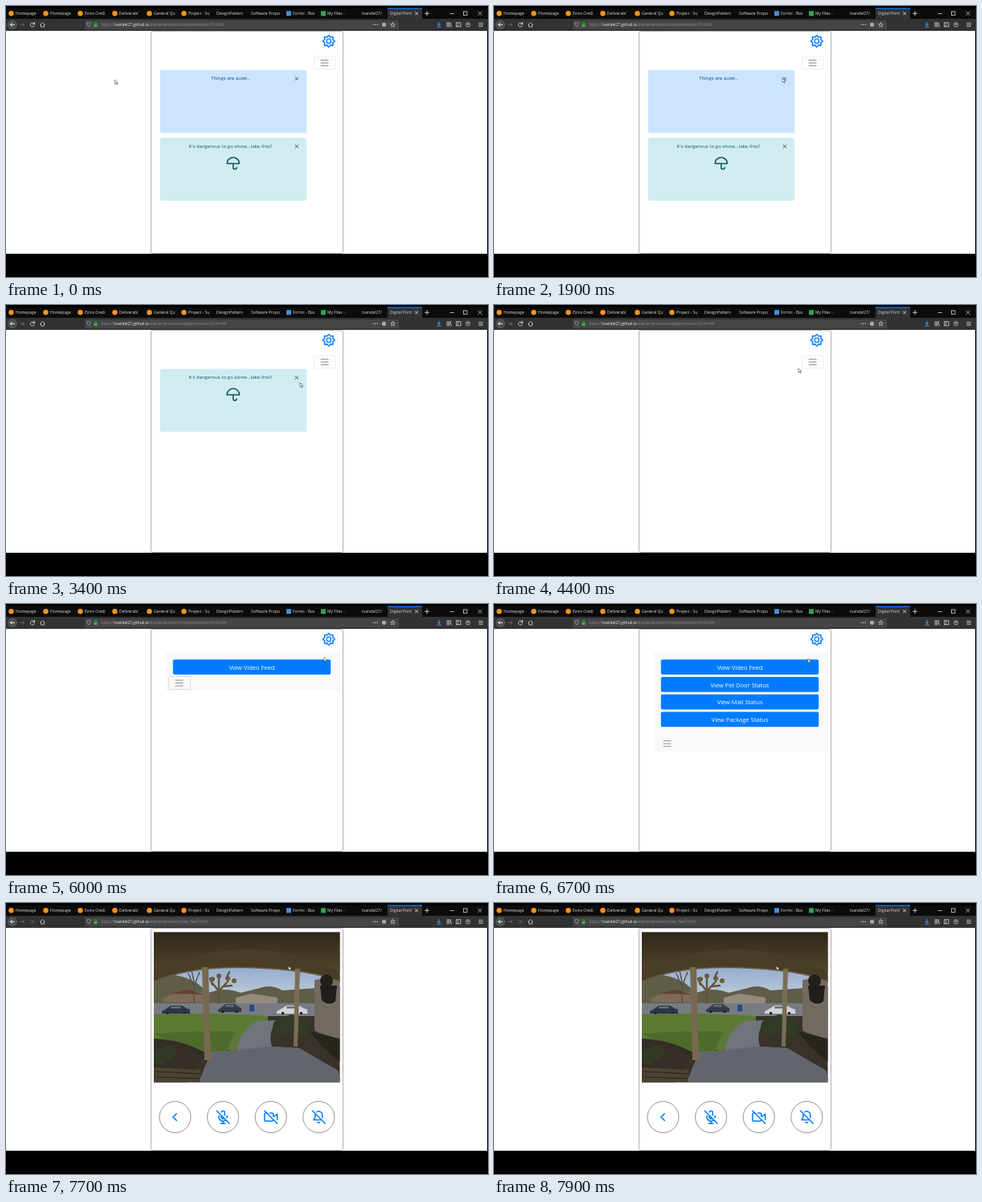
Recreate the animation shown at these times as an HTML page. Size 600 px wide and 338 px high, loop 8000 ms.

```html
<!DOCTYPE html>
<html lang="en">
<head>
<meta charset="utf-8">
<title>Door alerts</title>
<style>
  html, body { margin: 0; width: 100%; height: 100%; overflow: hidden; background: #000; }
  svg { display: block; width: 600px; height: 338px; font-family: "Open Sans", "Noto Sans", sans-serif; }
  .line { fill: none; stroke-linecap: round; stroke-linejoin: round; }
  .mid { text-anchor: middle; }
</style>
</head>
<body>
<svg id="stage" viewBox="0 0 600 338"></svg>
<script>
const LOOP = 8000, STEP = 100, BLUE = '#007bff';
const HOST = 'tvandel27.github.io', FEED = '/implementation/view_feed.html';
const HOME = '/implementation/implementation/UI.html';

const rect = (x, y, w, h, fill, more = '') =>
  `<rect x="${x}" y="${y}" width="${w}" height="${h}" fill="${fill}" ${more}/>`;
const disc = (x, y, r, fill, more = '') => `<circle cx="${x}" cy="${y}" r="${r}" fill="${fill}" ${more}/>`;
const text = (x, y, size, fill, str, more = '') =>
  `<text x="${x}" y="${y}" font-size="${size}" fill="${fill}" ${more}>${str}</text>`;
const line = (d, color, width = 1, more = '') =>
  `<path class="line" d="${d}" stroke="${color}" stroke-width="${width}" ${more}/>`;
const shape = (d, fill) => `<path d="${d}" fill="${fill}"/>`;
const group = (id, body, more = '') => `<g id="${id}" ${more}>${body}</g>`;
const cross = (x, y, r, color, width) =>
  line(`M${x - r} ${y - r}l${2 * r} ${2 * r}m0 ${-2 * r}l${-2 * r} ${2 * r}`, color, width);
// icon drawn on a 24-unit grid, centred on x, y
const icon = (x, y, scale, d, color, width = 2) =>
  line(d, color, width, `transform="translate(${x} ${y}) scale(${scale}) translate(-12 -12)"`);

function tabs() {
  const list = [
    [12, 'Homepage'], [55, 'Homepage'], [98, 'Extra Credi'], [141, 'Deliverabl'], [184, 'General Qu'],
    [227, 'Project - Su'], [262, 'DesignPattern'], [305, 'Software Propo'], [357, 'Forms - Bas'],
    [400, 'My Files - '], [443, 'tvandel27/'], [478, 'Digital Portl']];
  return rect(0, 0, 600, 17, '#0c0c0d') + rect(0, 0, 600, 3, '#000') +
    rect(475, 3, 43, 14, '#323234') + rect(475, 2.5, 43, 1.2, '#0a84ff') +
    list.map(([x, label], i) => text(x, 11.4, 5, '#dcdcde', label) +
      (i < 6 ? disc(x - 5.5, 9.3, 3.2, '#f7931e') : '')).join('') +
    rect(349, 6.3, 6, 6, '#4a8fd0') + rect(392, 6.3, 6, 6, '#2fa35a') +
    cross(511, 9.3, 1.7, '#eee', .8) + line('M521.5 9.3h5m-2.5-2.5v5', '#eee', .8) +
    line('M553 9.5h4.5', '#eee', .7) + rect(569.5, 7, 4.5, 4.5, 'none', 'stroke="#eee" stroke-width=".7"') +
    cross(590, 9.3, 2.2, '#eee', .7);
}

function toolbar() {
  const pale = '#d0d0d2';
  return rect(0, 16, 600, 15, '#323234') + rect(98, 18, 391, 11.5, '#454548', 'rx="1"') +
    disc(8, 23.3, 5.3, '#4a4a4d', 'stroke="#77777a" stroke-width=".6"') +
    line('M10.5 23.3h-5m2-2l-2 2l2 2', '#fff', .9) +
    line('M17.5 23.3h5m-2-2l2 2l-2 2', '#747477', .8) +
    group('reload', line('M35.3 22.2a2.6 2.6 0 1 0 .2 2M35.5 20.3v2.2h-2.2', pale, .9)) +
    group('stop', cross(33, 23.3, 1.9, '#7c7c80', .8)) +
    line('M42.5 23.3l3-2.6l3 2.6m-5 0v2.7h4v-2.7', pale, .8) +
    line('M101 21l2-.7l2 .7q0 4-2 5q-2-1-2-5', '#a0a0a3', .7) +
    rect(109.5, 22.8, 4, 3.2, '#30c030') + line('M110.3 22.8v-1a1.2 1.2 0 0 1 2.4 0v1', '#30c030', .7) +
    `<text x="118.5" y="25.2" font-size="4.8" fill="#8f8f93">https://<tspan fill="#f2f2f4">${HOST}</tspan><tspan id="path"></tspan></text>` +
    [457.5, 460, 462.5].map(x => disc(x, 23.3, .7, pale)).join('') +
    disc(470.5, 23.3, 2.6, '#a8a8ab') +
    icon(481.5, 23.3, .27, 'M12 2l3 7l7 .5l-5.5 4.8l2 7.2l-6.5-4l-6.5 4l2-7.2l-5.5-4.8l7-.5z', pale, 2.6) +
    line('M539 20.3v4m-1.7-1.6l1.7 1.7l1.7-1.7m-4 3.5h4.6', '#45a1ff', 1) +
    line('M549 20.5v5.5m1.6-5.5v5.5m1.6-5.5v5.5m1-5.2l1.4 5.2', pale, .8) +
    rect(560.5, 20.8, 5.5, 5, 'none', `stroke="${pale}" stroke-width=".8"`) + line('M562.7 21v4.6', pale, .7) +
    disc(575, 23.3, 2.7, 'none', `stroke="${pale}" stroke-width=".7"`) + disc(575, 22.7, 1, pale) +
    line('M588.5 21.3h5m-5 2h5m-5 2h5', pale, .8);
}

function gear() {
  let d = '';
  for (let i = 0; i < 32; i++) {
    const a = (i - .5) * Math.PI / 16 - Math.PI / 2, r = i % 4 < 2 ? 7.2 : 5.5;
    d += `${i ? 'L' : 'M'}${(401.8 + r * Math.cos(a)).toFixed(2)} ${(43.9 + r * Math.sin(a)).toFixed(2)}`;
  }
  return line(d + 'z', BLUE, 1.4) + disc(401.8, 43.9, 2.7, 'none', `stroke="${BLUE}" stroke-width="1.3"`);
}

const alertBox = (id, fill, edge, ink, label, extra = '') => group(id,
  rect(192.2, 80.2, 181.6, 77.6, fill, `stroke="${edge}" stroke-width=".5" rx="1.5"`) +
  text(279.3, 92.4, 6, ink, label, 'class="mid"') + cross(361.8, 90.6, 1.8, '#4c5a66', 1) + extra);

const menu = () => group('menu',
  rect(199, 61, 217, 1, '#f7f9fa', 'id="panel"') +
  `<clipPath id="fold"><rect id="foldBox" x="199" y="61" width="217" height="1"/></clipPath>` +
  group('links', ['View Video Feed', 'View Pet Door Status', 'View Mail Status', 'View Package Status']
    .map((label, i) => rect(207.8, 69.2 + i * 21.8, 196.4, 18.7, BLUE, `rx="1.8" id="link${i}"`) +
      text(306, 81.8 + i * 21.8, 7.5, '#fff', label, 'class="mid"')).join(''), 'clip-path="url(#fold)"'));

const toggler = () => group('toggler',
  rect(-13, -8, 27, 16, '#fdfdfd', 'id="outline" stroke="#e9eaeb" stroke-width=".7" rx="2"') +
  line('M-4.4-3.5h9m-9 3.5h9m-9 3.5h9', '#808080', .9));

function photo() {
  const car = (x, y, w, fill) =>
    shape(`M${x} ${y}l${w * .15}-3l${w * .17}-4h${w * .4}l${w * .2} 4l${w * .08} 1v5h${-w}z`, fill) +
    rect(x + w * .32, y - 6, w * .35, 2.5, '#66707a') +
    disc(x + w * .2, y + 2.5, 1.8, '#222') + disc(x + w * .8, y + 2.5, 1.8, '#222');
  const blobs = (list, fill) => list.map(([x, y, r]) => disc(x, y, r, fill)).join('');
  return `<linearGradient id="sky" x2="0" y2="1"><stop stop-color="#8fa9cf"/><stop offset="1" stop-color="#c3ced9"/></linearGradient>
    <linearGradient id="roof" x2="0" y2="1"><stop stop-color="#2f2718"/><stop offset="1" stop-color="#54462d"/></linearGradient>
    <clipPath id="crop"><rect x="184" y="36.5" width="231.5" height="187"/></clipPath><g clip-path="url(#crop)">` +
    rect(184, 76, 232, 45, 'url(#sky)') + rect(184, 138, 232, 86, '#38322a') +
    // far side of the street
    shape('M184 92q26-8 54 8l14 12q20-8 40 0l24-6q14-5 28 3l72-5v34H184z', '#5f5d48') +
    shape('M196 118l18-7h32l6 13h-56z', '#7c6a5b') + shape('M205 113l20-5l22 6z', '#65402f') +
    shape('M286 118l20-5l32 5v8h-52z', '#948b7e') +
    line('M234 124v-20l-7-16m7 16l7-18m-7 12l-3-14', '#57503f', 1.4) +
    line('M264 126l1-16l-8-10m8 10v-18m0 18l11-12m-6 6l11-1m-24-1l-3-8m20 0l4-8', '#645438', 2.4) +
    blobs([[257, 95, 3], [265, 91, 3], [276, 94, 3], [284, 97, 3]], '#6b5a37') +
    // street, lawn and beds
    rect(184, 125, 232, 16, '#787b82') +
    car(194, 135, 35, '#2b364a') + car(264, 133, 29, '#343c49') + car(337, 135, 38, '#cfd4d8') +
    rect(303, 127, 6, 8, '#284a8c') +
    shape('M184 139q70-3 142 2v6q-30 10-40 38l-102-16z', '#5c7a33') +
    shape('M184 163q50-4 102-3l-12 26q-30 2-54-6z', '#4d6b2c') +
    shape('M184 169q38 2 64 18l-22 37h-42z', '#352e26') +
    // walkway
    shape('M314 147l25-1q-14 14-8 33l34 2l48 28l5 15H240l15-38l32-2q4-26 27-37z', '#70747c') +
    shape('M255 187l74-8l36 2l48 28l5 15H240z', '#62656c') +
    blobs([[344, 155, 12], [356, 149, 10], [370, 156, 10], [203, 186, 9], [192, 192, 10]], '#313a24') +
    shape('M184 205l58 3v16h-58z', '#4c4231') + line('M186 210l55 3M186 217l54 2', '#2c261d', 1) +
    // house wall, porch roof, posts and lamp
    shape('M384 96l32-6v79q-18-2-32-10z', '#716a60') + shape('M378 160q20 4 38 10v28q-22-16-38-38z', '#28241e') +
    shape('M184 36h232v62q-30-12-62-14Q300 78 252 82Q212 86 184 99z', '#4a3d27') +
    shape('M184 36h232v50Q310 32 184 82z', 'url(#roof)') +
    line('M184 98Q212 86 252 82Q300 78 354 84Q386 87 416 98', '#6d5c40', 1.5) +
    shape('M244 80h8l3 116h-8z', '#776950') + shape('M360 82h6l-3 97h-5z', '#7a6d56') +
    disc(399, 97, 8, '#241f1a') + shape('M391 103h21l-2 20q-9 6-17-2z', '#211d19') + '</g>';
}

function feed() {
  const art = [
    'M14.5 6l-6 6l6 6',
    'M1 1l22 22M9 9v3a3 3 0 0 0 5.1 2.1M15 9.3V4a3 3 0 0 0-5.9-.6M17 17A7 7 0 0 1 5 12v-2m14 0v2a7 7 0 0 1-.1 1.2M12 19v4M8 23h8',
    'M16 16v1a2 2 0 0 1-2 2H3a2 2 0 0 1-2-2V7a2 2 0 0 1 2-2h2m5.7 0H14a2 2 0 0 1 2 2v3.3l1 1L23 7v10M1 1l22 22',
    'M13.7 21a2 2 0 0 1-3.5 0M18.6 13A18 18 0 0 1 18 8M6.3 6.3A6 6 0 0 0 6 8c0 7-3 9-3 9h14M18 8a6 6 0 0 0-9.3-5M1 1l22 22'];
  return group('feed', photo() + art.map((d, i) => {
    const x = 210.5 + i * 59.6;
    return disc(x, 267, 19.5, '#fff', 'stroke="#666" stroke-width=".7"') + icon(x, 267, .72, d, BLUE, 2.1);
  }).join(''));
}

const umbrella = icon(282.8, 112, .7, 'M23 12a11 11 0 0 0-22 0zm-5 7a3 3 0 0 1-6 0v-7', '#0c5460', 2.2);

document.getElementById('stage').innerHTML =
  rect(0, 0, 600, 338, '#000') + tabs() + toolbar() + rect(0, 31, 599, 278, '#fff') +
  rect(180.5, 31.5, 239, 277, '#fff', 'stroke="#999" stroke-width=".8" rx="2"') +
  group('home', gear() + menu() + toggler() +
    alertBox('quiet', '#cce5ff', '#b8daff', '#004085', 'Things are quiet..') +
    alertBox('danger', '#d1ecf1', '#bee5eb', '#0c5460', "It's dangerous to go alone...take this!!", umbrella)) +
  feed() +
  group('status', rect(0, 301, 125, 8, '#e9e9ea', 'stroke="#c4c4c6" stroke-width=".5"') +
    text(1.5, 306.6, 4.3, '#444', 'https://' + HOST + FEED)) +
  group('arrow', '<path d="M0 0v5.3l1.3-1.2l.9 2l.9-.4l-.9-2h1.7z" fill="#fff" stroke="#222" stroke-width=".5"/>') +
  group('hand', '<path d="M-.7 0q.7-.7 1.4 0v2.2l2.3.7q.6.3.4 1.1l-.7 2.2h-3.2l-1.9-2.4q.2-.9 1.7-.1z" fill="#fff" stroke="#222" stroke-width=".5"/>');

const el = id => document.getElementById(id);
const show = (id, on) => el(id).style.display = on ? '' : 'none';
const place = (id, x, y) => el(id).setAttribute('transform', `translate(${x} ${y})`);

// linear interpolation through [time, value...] points
function track(points, t) {
  const i = points.findIndex(p => p[0] > t);
  if (i < 0) return points[points.length - 1].slice(1);
  if (!i) return points[0].slice(1);
  const a = points[i - 1], b = points[i], k = (t - a[0]) / (b[0] - a[0]);
  return a.slice(1).map((v, j) => v + (b[j + 1] - v) * k);
}

const POINTER = [
  [100, 135.5, 92], [400, 198, 109], [800, 283, 111], [900, 283, 111], [1100, 292, 106], [1200, 292, 106],
  [1600, 338, 96], [1900, 359, 90], [2300, 359, 90], [2900, 366, 97], [4100, 366, 97], [4400, 379, 79],
  [5000, 396, 68], [5700, 396, 66.5], [6600, 396, 66.5], [7000, 375, 73], [7500, 352, 79], [7900, 351.5, 78.5]];
const UNFOLD = [[5900, 0], [6000, .22], [6100, .74], [6200, .95], [6300, 1]];

function draw(t) {
  const away = t >= 7700, open = t >= 6000;
  const [x, y] = track(POINTER, t), [fold] = track(UNFOLD, t);
  const hover = open && !away && y > 69;

  show('home', !away);
  show('feed', away);
  show('reload', t < 7600);
  show('stop', t >= 7600);
  el('path').textContent = away ? FEED : HOME + (t >= 2200 ? '#' : '');

  show('quiet', t < 2300);
  el('quiet').style.opacity = t < 2200 ? 1 : .4;
  show('danger', t < 4000);
  el('danger').style.opacity = t < 3900 ? 1 : .4;
  place('danger', 0, t < 2300 ? 84.6 : 0);

  show('menu', open);
  el('panel').setAttribute('height', 26 + 97 * fold);
  el('foldBox').setAttribute('height', 6 + 97 * fold);
  el('link0').setAttribute('fill', hover ? '#0062cc' : BLUE);
  place('toggler', open ? 215.5 : 396.5, open ? 77.2 + 97 * fold : 71);
  const outline = el('outline'), focused = t >= 5800 && t < 6700;
  outline.setAttribute('fill', open ? 'none' : '#fdfdfd');
  outline.setAttribute('stroke', focused ? '#aaa' : open ? 'none' : '#e9eaeb');
  outline.setAttribute('stroke-dasharray', focused ? '1 1' : 'none');

  show('status', hover);
  show('hand', hover);
  show('arrow', !hover);
  place('hand', x, y);
  place('arrow', x, y);
}

const start = performance.now();
function tick() {
  const t = (performance.now() - start) % LOOP;
  draw(Math.floor(t / STEP) * STEP);
  requestAnimationFrame(tick);
}
tick();
</script>
</body>
</html>
```
